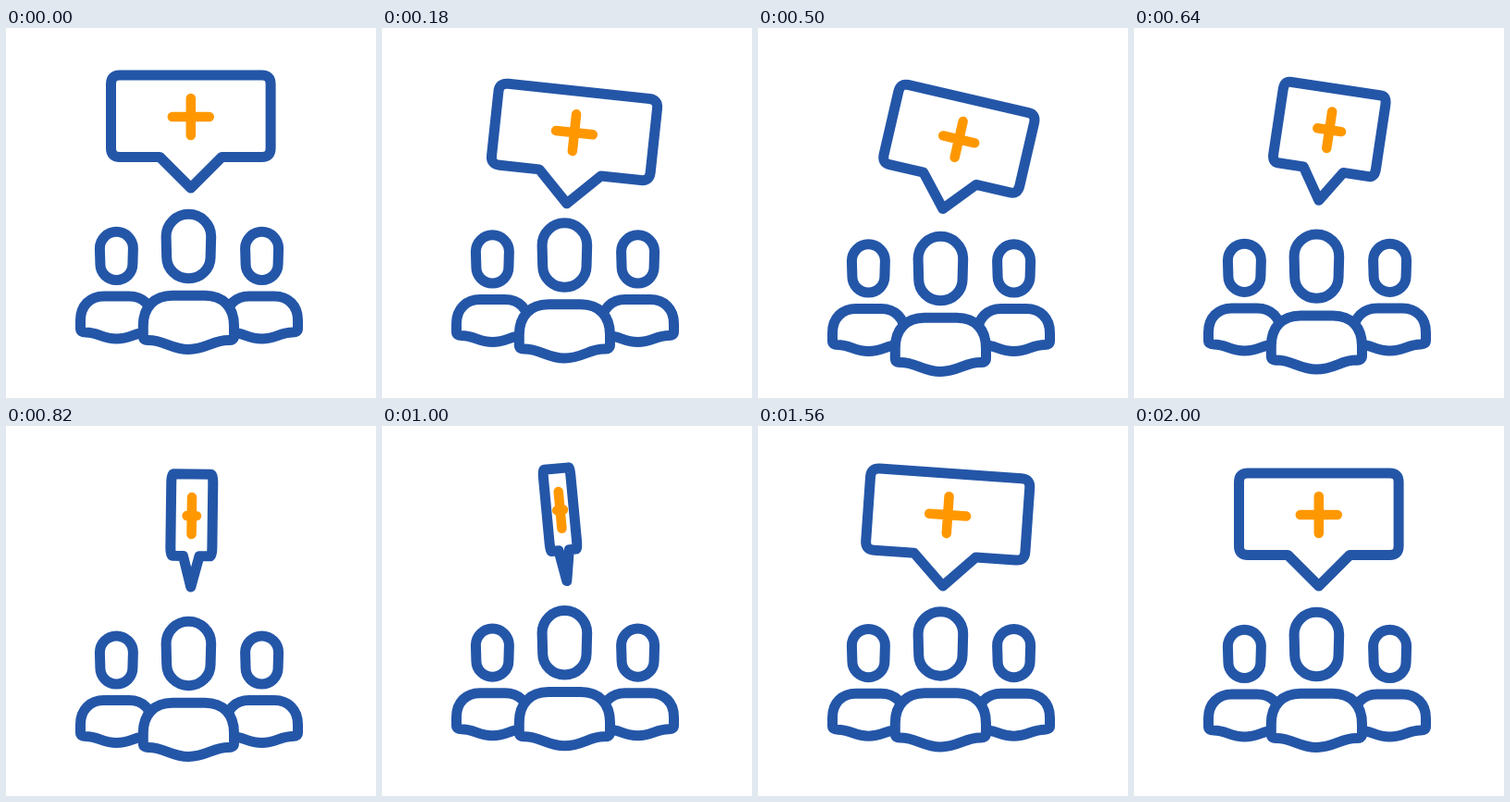
Recreate the animation shown at these times as an HTML page. Size 400 px wide and 400 px high, loop 3190 ms.

```html
<!DOCTYPE html>
<html lang="en">
<head>
<meta charset="utf-8">
<title>People and speech bubble</title>
<style>
  html, body { margin: 0; width: 100%; height: 100%; overflow: hidden; background: #fff; }
  svg { display: block; width: 100%; height: 100%; }
  path { fill: #fff; stroke: #2456a8; stroke-width: 11; stroke-linecap: round; stroke-linejoin: round; }
  #plus { stroke: #ff9800; stroke-width: 10.5; fill: none; }
</style>
</head>
<body>
<svg viewBox="0 0 400 400">
  <defs>
    <g id="person">
      <path d="M101.4 238.3a18 18 0 0 1 36 0l-.5 17a17.5 17.2 0 0 1-35 0z"/>
      <path d="M80.5 316C80.5 300 91 290 106 290H133C148 290 158.5 300 158.5 316V325Q158.5 329 153 329C139 329 135 336 119.5 336C104 336 100 329 86 329Q80.5 329 80.5 325Z"/>
    </g>
  </defs>
  <g id="sides">
    <use href="#person"/>
    <use href="#person" transform="translate(396) scale(-1 1)"/>
  </g>
  <g id="leader">
    <path d="M173.1 225.3a24.3 24 0 0 1 48.6 0l-.6 22.4a23.7 23 0 0 1-47.4 0z"/>
    <path d="M148.3 322C148.3 302 160 289.3 180 289.3H215C235 289.3 246.5 302 246.5 322V333Q246.5 338 240 337.5C224 337.5 216 347.5 197.4 347.5C179 347.5 171 337.5 154 337.5Q148.3 338 148.3 333Z"/>
  </g>
  <g id="bubble">
    <path id="outline"/>
    <path id="plus"/>
  </g>
</svg>
<script>
const LOOP = 3190;
const el = id => document.getElementById(id);

// Smooth 0 to 1 between two times.
function ease(t, start, end) {
  const p = Math.min(1, Math.max(0, (t - start) / (end - start)));
  return p * p * (3 - 2 * p);
}

const spin = t => 1 - 2 * ease(t, 310, 1550);
const drop = t => 28 * ease(t, 0, 320) - 33.5 * ease(t, 320, 1020) + 5.5 * ease(t, 1020, 1560);
const tilt = t => 14.2 * ease(t, 0, 400) - 20.7 * ease(t, 400, 1100)
  + 10.5 * ease(t, 1100, 1550) - 4 * ease(t, 1550, 2000);

// Sink, rest, spring past the start by 4, settle.
const bob = (t, depth) => depth * ease(t, 0, 420) - (depth + 4) * ease(t, 540, 1100) + 4 * ease(t, 1100, 1700);

// Coordinates are relative to the bubble's tip; only x is squeezed, so strokes keep their weight.
function drawBubble(width) {
  const left = -86.3, right = 86.3, top = -122, bottom = -33.5, round = 9.5;
  const at = (x, y) => `${(x * width).toFixed(2)} ${y} `;
  const line = (x, y) => 'L' + at(x, y);
  const corner = (x, y, x2, y2) => 'Q' + at(x, y) + at(x2, y2);
  el('outline').setAttribute('d', 'M0 0' + line(bottom, bottom)
    + line(left + round, bottom) + corner(left, bottom, left, bottom - round)
    + line(left, top + round) + corner(left, top, left + round, top)
    + line(right - round, top) + corner(right, top, right, top + round)
    + line(right, bottom - round) + corner(right, bottom, right - round, bottom)
    + line(-bottom, bottom) + 'Z');
  el('plus').setAttribute('d', 'M' + at(-20, -77) + line(20, -77) + 'M0 -97V-57');
}

function frame() {
  const t = performance.now() % LOOP;
  const move = (id, transform) => el(id).setAttribute('transform', transform);
  drawBubble(spin(t));
  move('bubble', `translate(199.8 ${173 + drop(t)}) rotate(${tilt(t)})`);
  move('leader', `translate(0 ${bob(t, 24)})`);
  move('sides', `translate(0 ${bob(t - 40, 13.5)})`);
  requestAnimationFrame(frame);
}
frame();
</script>
</body>
</html>
```
